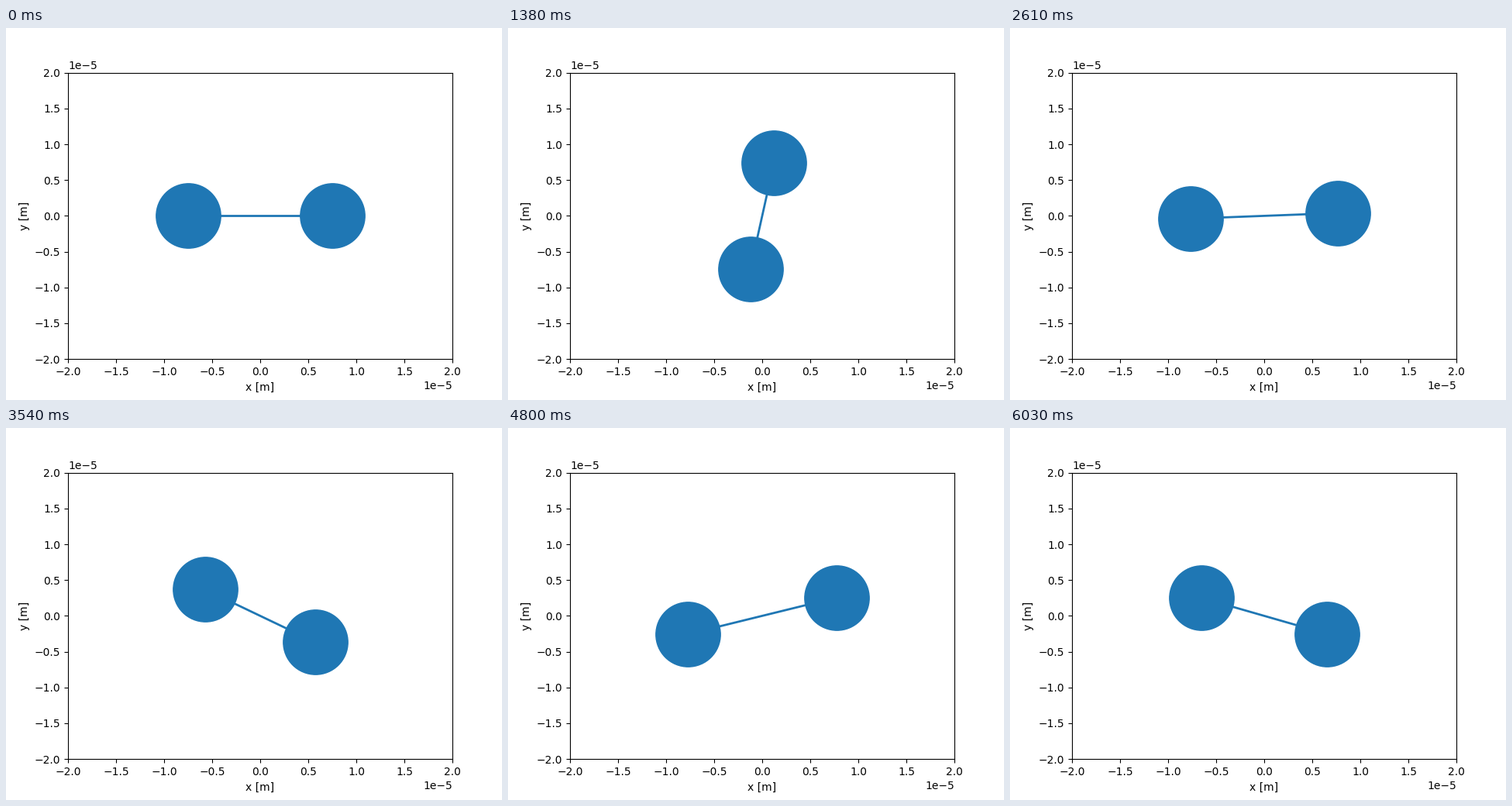
A matplotlib script that plays this animation: 640 px wide and 480 px high, repeating every 6.06 s.

```python
import numpy as np
import matplotlib.pyplot as plt
from matplotlib.animation import FuncAnimation

FRAMES, INTERVAL = 202, 30
SHEAR = 0.101      # strain per frame
REST = 7.5e-6      # half length of the relaxed spring
STIFF = 4.3        # spring rate relative to shear
TORQUE = 11.25e-12  # torque on the spheres, as a squared length
BIAS = 0.07
SUBSTEPS = 20


def rates(state):
    """Clockwise turning and stretching of a dumbbell in shear flow."""
    phi, r = state
    s, c = np.sin(phi), np.cos(phi)
    turn = (r**2 * s**2 + TORQUE) / (r**2 + 2 * TORQUE) + BIAS * s**3 * c
    stretch = -r * s * c - STIFF * (r - REST)
    return np.array([turn, stretch])


def strain(n):
    """Total strain after n frames, with a short spin-up."""
    return SHEAR * (n - 1 + np.exp(-n))


def simulate():
    state = np.array([0.0, REST])
    path = [state]
    for n in range(1, FRAMES):
        dt = (strain(n) - strain(n - 1)) / SUBSTEPS
        for _ in range(SUBSTEPS):
            mid = state + rates(state) * dt / 2
            state = state + rates(mid) * dt
        path.append(state)
    return np.array(path)


phi, r = simulate().T
xs, ys = r * np.cos(phi), -r * np.sin(phi)

fig, ax = plt.subplots(figsize=(6.4, 4.8), dpi=100)
ax.set_xlim(-2e-5, 2e-5)
ax.set_ylim(-2e-5, 2e-5)
ax.set_xlabel("x [m]")
ax.set_ylabel("y [m]")
dumbbell, = ax.plot([], [], "o-", color="#1f77b4", lw=2, ms=60)


def update(n):
    dumbbell.set_data([-xs[n], xs[n]], [-ys[n], ys[n]])
    return dumbbell,


anim = FuncAnimation(fig, update, frames=FRAMES, interval=INTERVAL,
                     repeat=True, repeat_delay=0)
plt.show()
```
